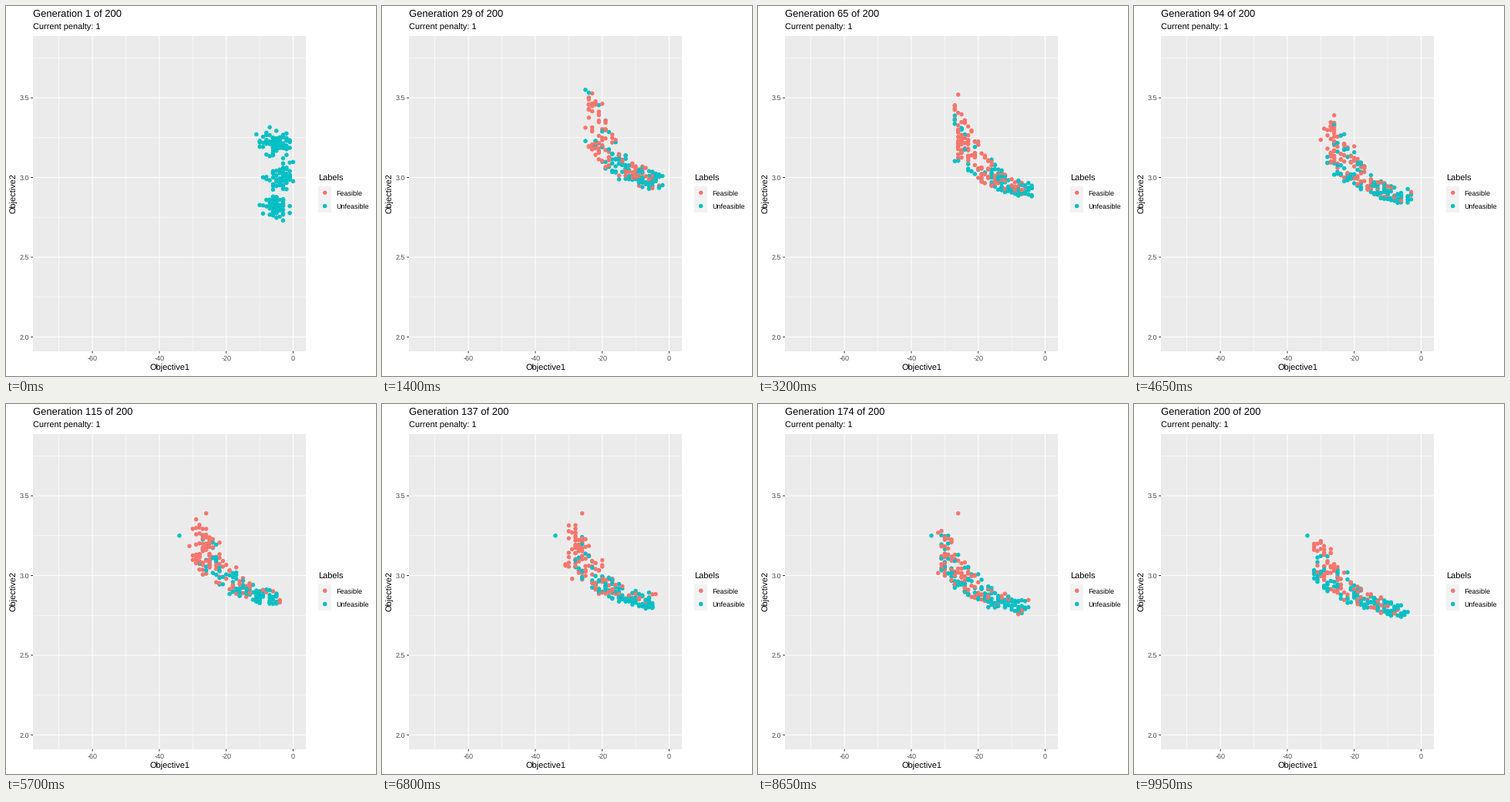
A matplotlib script for the animation above (10 s loop, 480 px wide and 480 px high).

```python
import numpy as np
import matplotlib.pyplot as plt
from matplotlib.animation import FuncAnimation
from matplotlib.patches import Rectangle

SIZE, DPI = 480, 80
PT = 72 / DPI                      # points per pixel
GENERATIONS, POPULATION = 200, 215
SETTLED = 29                       # generation when the front has formed
FEASIBLE, UNFEASIBLE = "#F8766D", "#00BFC4"
LEFT, TOP, RIGHT, BOTTOM = 35, 38.5, 389, 447.7

plt.rcParams["font.family"] = "Liberation Sans"
plt.rcParams["text.hinting"] = "none"
plt.rcParams["text.hinting_factor"] = 1

# Lasting outliers: x, y, first and last generation, feasible
LEADERS = [
    (-25, 3.55, 22, 40, 0),
    (-26, 3.52, 50, 80, 1),
    (-26, 3.39, 85, 185, 1),
    (-34, 3.25, 115, 200, 0),
]


def px(x):
    return 372.5 + 4.34 * np.asarray(x)


def py(y):
    return 222.5 - 206.8 * (np.asarray(y) - 3)


def start_points(rng, count):
    """Three clusters stacked one above the other."""
    k = rng.choice([-1, 0, 1], count, p=[0.25, 0.33, 0.42])
    dx, dy = rng.normal(size=(2, count)).clip(-2.8, 2.8)
    x = -np.abs(-3.8 - 1.4 * np.abs(k) + 2 * dx)
    y = 3.015 + 0.205 * k + (0.054 - 0.02 * np.abs(k)) * dy
    return x, y


def front_points(u, v, gen):
    """A band falling to the right, sinking and stretching left with time."""
    r = max(0, np.sqrt(gen) - np.sqrt(SETTLED))
    left, right = -24 - 0.87 * r, -2.5 - 0.34 * r
    x = left + (right - left) * u ** 1.35
    low = 2.93 - 0.022 * r + 0.26 * (1 - u) ** 1.5
    depth = 0.09 + (0.30 - 0.014 * r) * np.cos(np.pi / 2 * u) ** 3
    return x, low + depth * v ** 1.2


def breed(rng, gen, count):
    u, v = rng.random((2, count))
    ahead = min(gen + 5, GENERATIONS)
    mix = min(1, (np.sqrt(ahead) - 1) / (np.sqrt(SETTLED) - 1))
    x0, y0 = start_points(rng, count)
    x1, y1 = front_points(u, v, ahead)
    x = x0 + (x1 - x0) * mix + rng.normal(0, 0.8, count)
    y = y0 + (y1 - y0) * mix
    chance = min(1, gen / 18) * (0.18 + 0.65 * (1 - u) + 0.3 * (v - 0.5))
    return np.column_stack([np.round(x), y, rng.random(count) < chance])


def evolve():
    rng = np.random.default_rng(12)
    x, y = start_points(rng, POPULATION)
    people = np.column_stack([np.round(x), y, np.zeros(POPULATION)])
    expiry = rng.integers(2, 15, POPULATION)
    history = []
    for gen in range(1, GENERATIONS + 1):
        dead = expiry <= gen
        count = dead.sum()
        people[dead] = breed(rng, gen, count)
        expiry[dead] = gen + rng.integers(2, 15, count)
        leaders = [(x, y, ok) for x, y, first, last, ok in LEADERS
                   if first <= gen <= last]
        history.append(np.vstack([people, np.reshape(leaders, (-1, 3))]))
    return history


fig = plt.figure(figsize=(SIZE / DPI, SIZE / DPI), dpi=DPI, facecolor="white")
ax = fig.add_axes([0, 0, 1, 1])
ax.set(xlim=(0, SIZE), ylim=(SIZE, 0))
ax.axis("off")


def box(x, y, w, h, color):
    ax.add_patch(Rectangle((x, y), w, h, fc=color, ec="none", zorder=0))


def line(xs, ys, color, width):
    ax.plot(xs, ys, color=color, lw=width * PT, solid_capstyle="butt",
            snap=False, zorder=1)


def grid_x(x, width):
    line([px(x)] * 2, [TOP, BOTTOM], "white", width)


def grid_y(y, width):
    line([LEFT, RIGHT], [py(y)] * 2, "white", width)


def label(x, y, text, size, color="black", **kw):
    return ax.text(x, y, text, fontsize=size * PT, color=color,
                   va="baseline", **kw)


def dots(offsets, colors):
    return ax.scatter(*np.transpose(offsets), s=(5.5 * PT) ** 2, c=colors,
                      linewidths=0, zorder=3)


box(LEFT, TOP, RIGHT - LEFT, BOTTOM - TOP, "#EBEBEB")
for i in range(4):
    x, y = -20 * i, 2 + 0.5 * i
    grid_x(x - 10, 0.6)
    grid_y(y + 0.25, 0.6)
for i in range(4):
    x, y = -20 * i, 2 + 0.5 * i
    grid_x(x, 1.1)
    grid_y(y, 1.1)
    line([px(x)] * 2, [BOTTOM, BOTTOM + 2.8], "#333333", 1)
    line([LEFT - 2.8, LEFT], [py(y)] * 2, "#333333", 1)
    label(px(x), 460, str(x), 9, "#4D4D4D", ha="center")
    label(30, py(y) + 3.3, f"{y:.1f}", 9, "#4D4D4D", ha="right")

title = label(LEFT, 14, "", 13)
label(LEFT, 31, "Current penalty: 1", 11)
label(212, 473, "Objective1", 11, ha="center")
label(13, 243, "Objective2", 11, ha="center", rotation=90,
      rotation_mode="anchor")

label(405, 227, "Labels", 11)
box(405, 233.6, 17.3, 34.6, "#F2F2F2")
label(428, 245.7, "Feasible", 9)
label(428, 263, "Unfeasible", 9)
dots([(413.7, 242.2), (413.7, 259.5)], [FEASIBLE, UNFEASIBLE])

history = evolve()
cloud = dots([(0, 0)], [UNFEASIBLE])


def update(i):
    x, y, feasible = history[i].T
    cloud.set_offsets(np.column_stack([px(x), py(y)]))
    cloud.set_facecolor([FEASIBLE if ok else UNFEASIBLE for ok in feasible])
    title.set_text(f"Generation {i + 1} of {GENERATIONS}")
    return cloud, title


anim = FuncAnimation(fig, update, frames=GENERATIONS, interval=50, repeat=True)
plt.show()
```
